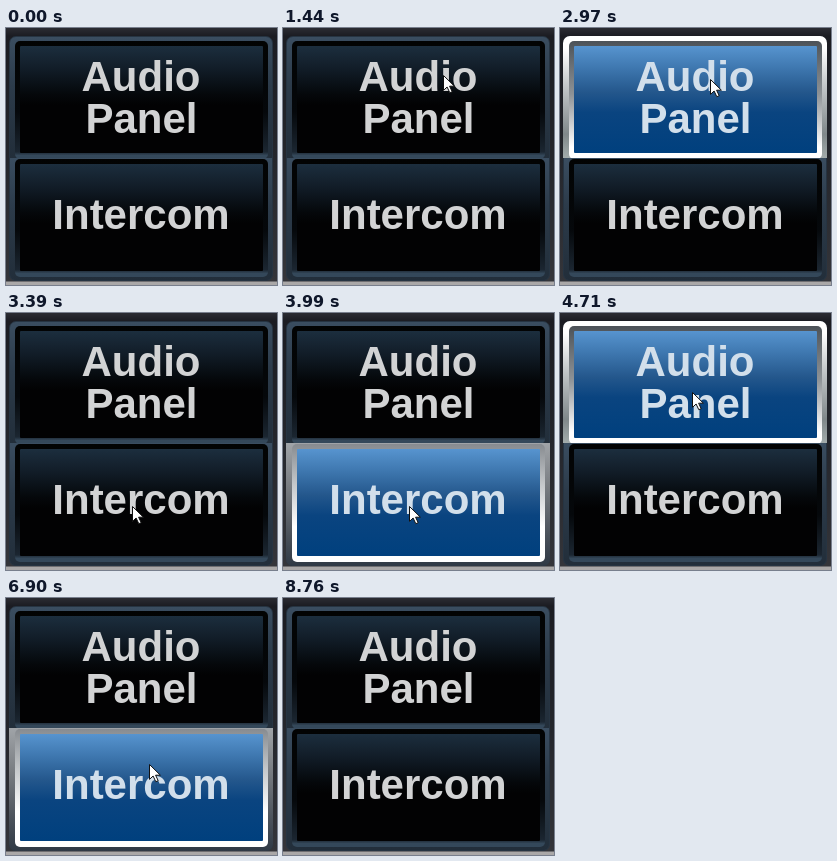
Write an HTML page that moves like this. It is 271x257 px and loops after 9.24 s.

```html
<!DOCTYPE html>
<html lang="en">
<head>
<meta charset="utf-8">
<title>Audio panel keys</title>
<style>
  html, body { margin: 0; width: 100%; height: 100%; overflow: hidden; background: #202128; }
  #stage {
    position: relative; width: 271px; height: 257px; overflow: hidden;
    background: linear-gradient(#2b2c33 0, #1b1c22 8px, #24262c 130px, #34353a 253px, #aaa8a8 254px);
  }
  .key, .key div { position: absolute; box-sizing: border-box; }
  .key { left: 3px; width: 264px; }
  #audio { top: 8px; height: 123px; --round: 7px 7px 0 0; }
  #intercom { top: 130px; height: 123px; --round: 0 0 7px 7px; }
  .rim, .off, .on { inset: 0; }
  .rim { border-radius: var(--round); }
  .ring { left: 6px; right: 5px; top: 5px; bottom: 0; border-radius: 5px; }
  .face { left: 11px; right: 10px; top: 10px; bottom: 6px; border-radius: 1px; }
  #intercom .ring { top: 1px; bottom: 4px; }
  #intercom .face { top: 6px; bottom: 10px; }

  /* Bevel: the rim catches light from above, the ring from below. */
  .off .rim { background: linear-gradient(#3a4d60, #2c3b4a 40%, #222e3a); border: 1px solid #263442; }
  #intercom .off .rim { border-top: 0; }
  .off .ring { background: linear-gradient(#020303 0, #05080b 60%, #1b2631 94%, #34485a 97%); }
  .off .face { background: linear-gradient(#1c2e3e, #111c27 22%, #05080b 45%, #020203 55%); }

  .on { visibility: hidden; }
  .on .rim { background: linear-gradient(#fff 10%, #c4c8ca 40%, #80888a 80%, #a4adad); }
  .on .ring { background: linear-gradient(#4c5258, #8d9296 45%, #fff 90%); }
  #intercom .on .rim { background: linear-gradient(#a0a4a8, #797d82 35%, #4a515a 75%, #2f3945); }
  #intercom .on .ring { background: linear-gradient(#878b90, #c6c9cc 35%, #fff 70%); }
  .on .face { background: linear-gradient(#5794cf, #3f78b0 20%, #24578c 43%, #0a4480 62%, #00407e); }

  svg { position: absolute; left: 0; top: 0; }
  text {
    font: bold 42px "Liberation Sans", Arial, sans-serif;
    text-anchor: middle; fill: #d2d3d4;
  }
  .lit { fill: #d2dfeb; }
</style>
</head>
<body>
<div id="stage">
  <div class="key" id="audio">
    <div class="off"><div class="rim"></div><div class="ring"></div><div class="face"></div></div>
    <div class="on"><div class="rim"></div><div class="ring"></div><div class="face"></div></div>
  </div>
  <div class="key" id="intercom">
    <div class="off"><div class="rim"></div><div class="ring"></div><div class="face"></div></div>
    <div class="on"><div class="rim"></div><div class="ring"></div><div class="face"></div></div>
  </div>
  <svg width="271" height="257">
    <g id="audio-label">
      <text x="135" y="63">Audio</text>
      <text x="135.5" y="105">Panel</text>
    </g>
    <g id="intercom-label"><text x="135" y="201">Intercom</text></g>
    <path id="cursor" d="M.5 .5V15.4L4.1 12 6.8 17.7 9.2 16.7 6.6 11.2H11.4Z"
      fill="#fff" stroke="#111" stroke-width="1"/>
  </svg>
</div>
<script>
  const LOOP = 9240, TICK = 30;
  const cursor = document.getElementById('cursor');
  const lamps = [
    ['audio', [[1710, 1920], [2970, 3090], [4710, 6150]]],
    ['intercom', [[3570, 3690], [3990, 4140], [6900, 8280]]]
  ].map(([id, spans]) => ({
    light: document.querySelector(`#${id} .on`),
    labels: document.querySelectorAll(`#${id}-label text`),
    spans
  }));

  const easeOut = p => 1 - (1 - p) ** 2;
  const smooth = p => p * p * (3 - 2 * p);

  // start, end, from, to, easing
  const moves = [
    [390, 630, [243, 34], [161, 46], easeOut],
    [1410, 1560, [161, 46], [150, 51], smooth],
    [3210, 3330, [150, 51], [119, 166], smooth],
    [3330, 3390, [119, 166], [126, 193], easeOut],
    [4320, 4530, [126, 193], [132, 79], smooth],
    [6390, 6660, [132, 79], [143, 166], smooth],
    [8460, 8760, [143, 166], [272, 57], smooth]
  ];

  function cursorAt(t) {
    if (t < 390 || t >= 8760) return null;
    const [start, end, from, to, ease] = moves.filter(m => m[0] <= t).pop();
    const p = ease(Math.min(1, (t - start) / (end - start)));
    return from.map((v, i) => Math.round(v + (to[i] - v) * p));
  }

  function draw() {
    const t = Math.floor(performance.now() % LOOP / TICK) * TICK;
    for (const { light, labels, spans } of lamps) {
      const lit = spans.some(([a, b]) => t >= a && t < b);
      light.style.visibility = lit ? 'visible' : 'hidden';
      labels.forEach(label => label.classList.toggle('lit', lit));
    }
    const pos = cursorAt(t);
    cursor.style.visibility = pos ? 'visible' : 'hidden';
    if (pos) cursor.setAttribute('transform', `translate(${pos})`);
    requestAnimationFrame(draw);
  }
  draw();
</script>
</body>
</html>
```
